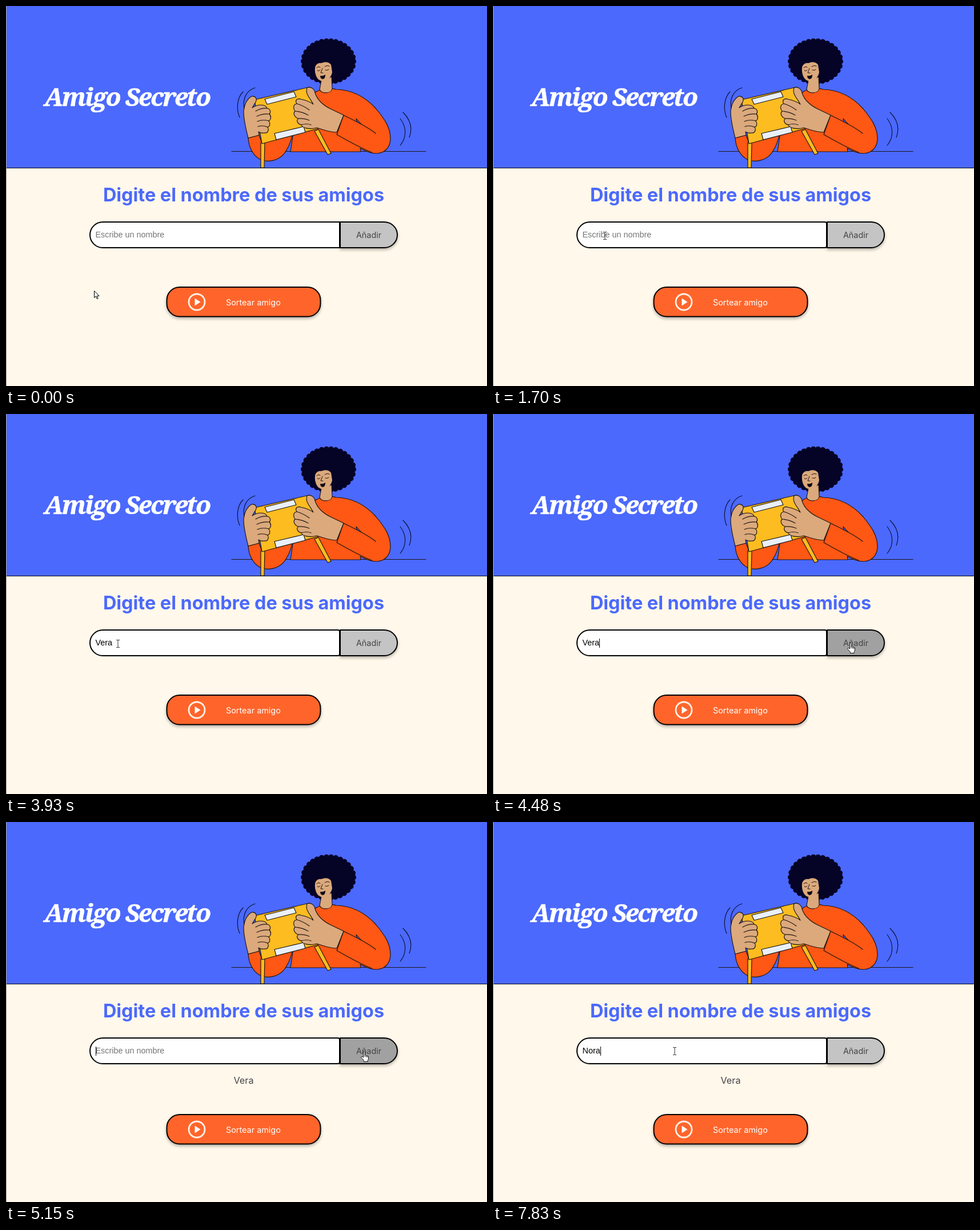
An HTML page for the animation above (8000 ms loop, 842 px wide and 665 px high).

```html
<!DOCTYPE html>
<html lang="es">
<head>
<meta charset="utf-8">
<title>Amigo Secreto</title>
<style>
  html, body { margin: 0; width: 100%; height: 100%; overflow: hidden; background: #fff8eb; }
  svg { display: block; }
  text { font: 14.4px Inter, sans-serif; }
  .title { font: italic 700 44px "Noto Serif", serif; letter-spacing: -2.35px; fill: #fff; stroke: #fff; stroke-width: .6; }
  .heading { font-size: 32.4px; font-weight: 700; fill: #4b69fd; }
  .field { font-family: "Liberation Sans", Arial, sans-serif; }
  .middle { text-anchor: middle; }
  .box { stroke: #000; stroke-width: 2; }
  .shadow { filter: drop-shadow(0 3px 2.5px rgba(0, 0, 0, .28)); }
  .art { stroke: #1d1612; stroke-width: 1.15; stroke-linejoin: round; stroke-linecap: round; }
  .line { fill: none; }
  .skin { fill: #dba97c; }
  .orange { fill: #ff5714; }
  .yellow { fill: #fdbc20; }
  .label { fill: #eaf0f8; }
</style>
</head>
<body>
<svg width="842" height="665" viewBox="0 0 842 665">
  <rect width="842" height="665" fill="#fff8eb"/>
  <rect width="842" height="283" fill="#4b69fd"/>
  <rect y="283" width="842" height="1" fill="#000"/>
  <rect width="1" height="665" fill="#a5a29f"/>
  <text class="title" x="67" y="175">Amigo Secreto</text>

  <g class="art">
    <path class="line" d="M395 254.5H735"/>
    <!-- hair, neck and face -->
    <ellipse cx="564.5" cy="97" rx="43.5" ry="35.5" fill="#050326" stroke="#050326" stroke-width="10" stroke-dasharray="0 8.3"/>
    <path class="orange" d="M498 255L502 228L540 152C548 145 571 143 578 146C610 147 632 162 648 180C662 197 673 212 673 232C673 248 662 258 648 258C640 258 631 255 620 249L621 255Z"/>
    <path class="skin" d="M552 130L570 124L571 145C569 154 551 154 549 146Z"/>
    <path class="skin" stroke="none" d="M541 108C542 102 547 99 552 100C559 97 566 98 569 103L571 116C569 126 561 133 552 131C543 129 540 116 541 108Z"/>
    <path class="line" stroke-width="1" d="M544 108Q547 105 550 107M558 106Q562 103 566 105M545 113Q548 115 550 112M559 112Q562 114 565 111M554 109L551 117L555 117"/>
    <path fill="#120b18" stroke="none" d="M550 122Q555 123 559 120Q559 128 554 128Q550 127 550 122Z"/>
    <!-- right sleeve -->
    <path fill="#4b69fd" d="M613 197C617 202 620 205 623 208L614 203Z"/>
    <path class="orange" d="M640 256C619 248 599 236 579 225L591 191C612 202 631 210 647 223"/>
    <!-- left sleeve and box -->
    <path class="orange" d="M424 231C425 247 432 262 446 269C458 274 478 271 488 257C495 247 499 236 501 226L448 240L443 226Z"/>
    <path class="yellow" d="M446 239L453 238L452 283H446ZM540 219L547 216L569 258L563 260Z"/>
    <path class="yellow" d="M435 164L531 142L548 214L448 241Z"/>
    <path class="label" d="M453 163L504 150L508 159L457 172ZM470 223L521 211L524 221L473 234Z"/>
    <!-- hands -->
    <path class="skin" d="M424 231C420 215 416 200 416 185C417 172 422 163 430 158C437 157 440 163 437 168L431 178C441 171 455 172 457 179C463 180 464 186 461 189C465 193 464 199 460 201C463 206 462 211 458 212C461 217 458 223 453 222C449 223 445 222 442 220L443 226Z"/>
    <path class="line" d="M457 179Q447 178 437 184M461 189Q449 188 439 193M460 201Q449 198 440 202M458 212Q449 208 441 211"/>
    <path class="skin" d="M527 143C534 140 540 146 541 152C545 165 556 174 568 180L591 191L579 221C566 221 553 216 544 213C531 217 518 213 517 208C509 206 508 199 512 197C505 195 502 188 506 184C502 179 503 172 509 171C505 165 510 161 516 163C525 165 533 168 538 172C533 162 523 154 527 143Z"/>
    <path class="line" d="M509 171Q520 174 531 182M506 184Q518 185 529 191M512 197Q522 196 531 200M517 208Q526 205 534 208"/>
    <path class="line" stroke="#0b1135" d="M415 150C404 161 403 181 409 195M436 143C421 148 414 161 417 179M695 186C708 199 712 214 706 230M690 197C701 211 702 230 690 244"/>
  </g>

  <text class="heading middle" x="416" y="342">Digite el nombre de sus amigos</text>

  <path id="add" class="box shadow" d="M585 378H662A23 22.5 0 0 1 662 423H585Z"/>
  <text class="middle" x="635" y="406" fill="#444">Añadir</text>
  <path id="input" class="box" fill="#fff"/>
  <text id="value" class="field" x="156.5" y="405"></text>
  <rect id="caret" y="393" width="1" height="16"/>
  <text id="friend" class="middle" x="416" y="458" fill="#444" style="font-size:16.2px">Vera</text>

  <g id="draw">
    <rect class="box shadow" x="281.5" y="492" width="269" height="51.5" rx="22.5" fill="#ff652b"/>
    <circle cx="334" cy="518" r="14" fill="none" stroke="#fff2e8" stroke-width="2.8"/>
    <path d="M330.5 511.5L340.5 518L330.5 524.5Z" fill="#fff"/>
    <text x="385" y="523.5" fill="#fff">Sortear amigo</text>
  </g>

  <g id="arrow"><path d="M.5 .5V12.5L3.3 9.9L5.3 14.5L7.2 13.7L5.2 9.3H9Z" fill="#fff" stroke="#000"/></g>
  <g id="beam"><path d="M-3 -6.5H-1Q0 -6.5 0 -5.5Q0 -6.5 1 -6.5H3M0 -5.5V5.5M-3 6.5H-1Q0 6.5 0 5.5Q0 6.5 1 6.5H3" fill="none" stroke="#333"/></g>
  <g id="hand"><path d="M4.5 11V2Q4.5 .5 5.7 .5T7 2V7Q9 6 9.5 7.5Q11.3 7 11.7 8.5Q13.5 8.2 13.5 10V13Q13.5 15 12 16.5V18.5H5.5V16.5L1 11.5Q.2 10 1.3 9.5T4.5 11ZM7 7V10M9.5 7.5V10.5M11.7 8.5V11" fill="#fff" stroke="#111"/></g>
</svg>
<script>
  const LOOP = 8000;
  const $ = id => document.getElementById(id);
  const cursors = ['arrow', 'beam', 'hand'];

  // Each row: start time in ms, then the values that hold from there on.
  const pointer = [
    [0, 'arrow', 154, 498], [390, 'arrow', 157, 488], [520, 'arrow', 170, 450],
    [650, 'beam', 188, 412.5], [790, 'beam', 196, 402],
    [4080, 'beam', 262, 404.5], [4210, 'beam', 486, 412.5],
    [4350, 'hand', 602, 403], [4480, 'hand', 620, 400], [4620, 'hand', 621, 401],
    [5540, 'beam', 431, 410.5], [5680, 'beam', 356, 405.5],
    [5810, 'beam', 320, 402.5], [5950, 'beam', 318, 401]
  ];
  const typed = [
    [0, ''], [2360, 'V'], [2880, 'Ve'], [3290, 'Ver'], [3410, 'Vera'],
    [5150, ''], [7000, 'N'], [7270, 'No'], [7410, 'Nor'], [7830, 'Nora']
  ];
  const caretOn = [
    [0, false], [1190, true], [1700, false], [2230, true], [3930, false], [4480, true],
    [5000, false], [5150, true], [5680, false], [6070, true], [6580, false], [7000, true]
  ];
  const focused = [[0, false], [1190, true], [5000, false], [5150, true]];

  const at = (rows, t) => rows.filter(row => row[0] <= t).pop().slice(1);
  const show = (el, on) => el.setAttribute('visibility', on ? 'visible' : 'hidden');

  const inputShape = r =>
    `M169.5 378H${584 - r}Q584 378 584 ${378 + r}V${423 - r}Q584 423 ${584 - r} 423H169.5A22.5 22.5 0 0 1 169.5 378Z`;

  function render(t) {
    const [kind, x, y] = at(pointer, t);
    for (const name of cursors) show($(name), name === kind);
    $(kind).setAttribute('transform', `translate(${x} ${y})`);

    const [text] = at(typed, t);
    const value = $('value');
    value.textContent = text || 'Escribe un nombre';
    value.setAttribute('fill', text ? '#000' : '#757575');
    const width = text ? value.getComputedTextLength() : 0;
    $('caret').setAttribute('x', Math.floor(157 + width));
    show($('caret'), at(caretOn, t)[0]);

    $('input').setAttribute('d', inputShape(at(focused, t)[0] ? 3 : 0));
    $('add').setAttribute('fill', kind === 'hand' ? '#a1a1a1' : '#c4c4c4');

    const added = t >= 5150;
    show($('friend'), added);
    $('draw').setAttribute('transform', `translate(0 ${added ? 20 : 0})`);
  }

  const start = performance.now();
  function tick() {
    render((performance.now() - start) % LOOP);
    requestAnimationFrame(tick);
  }
  tick();
</script>
</body>
</html>
```
